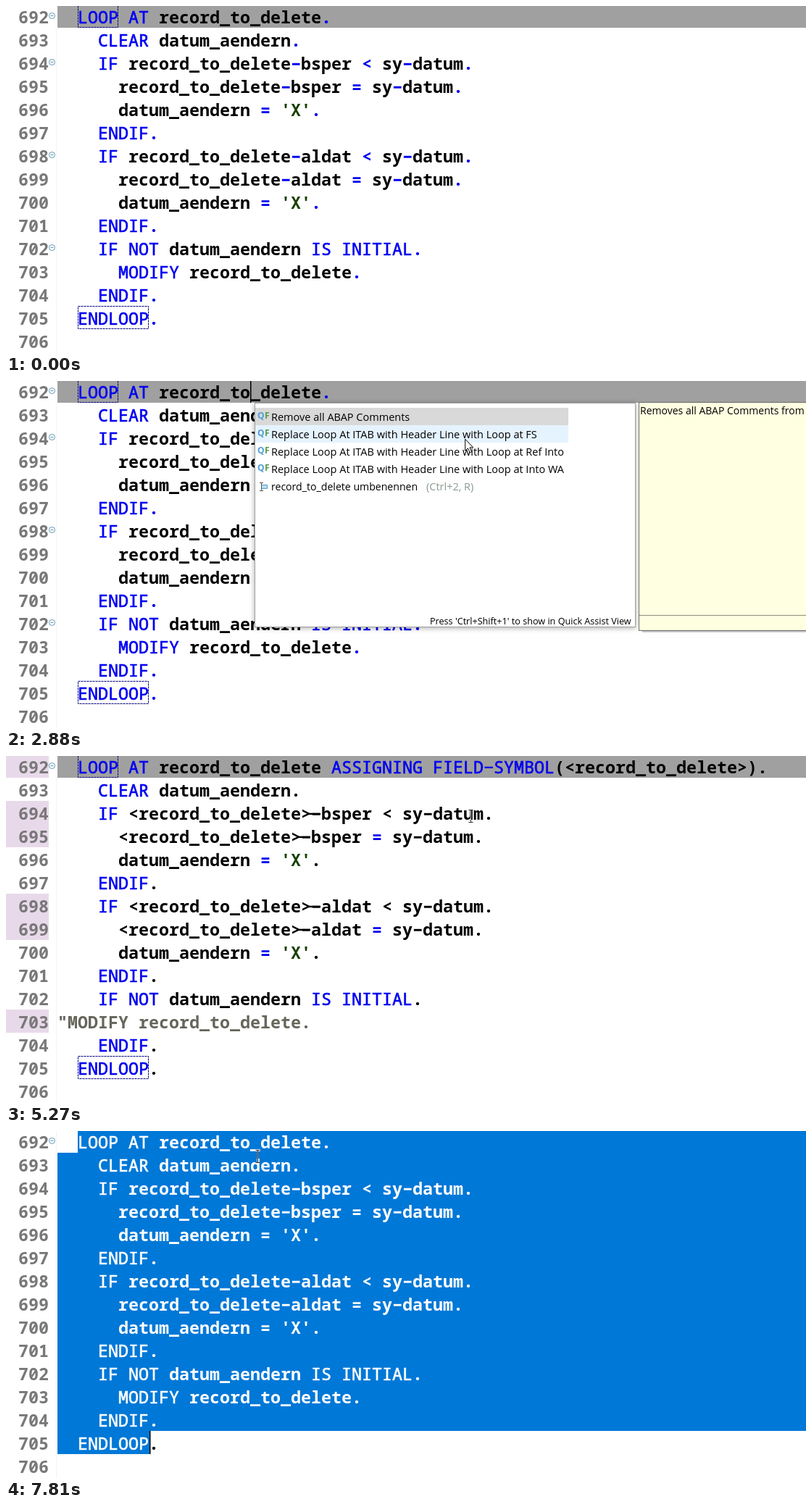
Animation of 1104 by 479 pixels, one loop 8 s. Source, as an HTML page with a canvas:

```html
<!DOCTYPE html>
<html>
<head>
<meta charset="utf-8">
<style>
html, body { margin: 0; width: 100%; height: 100%; overflow: hidden; background: #fff; }
canvas { display: block; }
</style>
</head>
<body>
<canvas id="stage" width="1104" height="479"></canvas>
<script>
const g = document.getElementById('stage').getContext('2d');
const LOOP_MS = 8000, ROW = 32, CELL = 14, LEFT = 71;
const BLUE = '#0000f0';
const mono = weight => `${weight} ${CELL / 0.6}px "Noto Sans Mono", "DejaVu Sans Mono", monospace`;
const sans = (size, weight = 400) => `${weight} ${size}px "Open Sans", "Noto Sans", sans-serif`;

const before = `  LOOP AT record_to_delete.
    CLEAR datum_aendern.
    IF record_to_delete-bsper < sy-datum.
      record_to_delete-bsper = sy-datum.
      datum_aendern = 'X'.
    ENDIF.
    IF record_to_delete-aldat < sy-datum.
      record_to_delete-aldat = sy-datum.
      datum_aendern = 'X'.
    ENDIF.
    IF NOT datum_aendern IS INITIAL.
      MODIFY record_to_delete.
    ENDIF.
  ENDLOOP.`.split('\n');
const after = before.map((line, i) =>
  i === 0 ? line.replace('.', ' ASSIGNING FIELD-SYMBOL(<record_to_delete>).')
  : i === 11 ? '"' + line.trim()
  : line.replace('record_to_delete', '<record_to_delete>'));
const changedRows = [0, 2, 3, 6, 7, 11];
const foldRows = [0, 2, 6, 10];
const TOKEN = /".*|'X'|<\w+>|[A-Z][A-Z-]*[A-Z]|\w+|\S/g;

const proposals = [
  'Remove all ABAP Comments',
  'Replace Loop At ITAB with Header Line with Loop at FS',
  'Replace Loop At ITAB with Header Line with Loop at Ref Into',
  'Replace Loop At ITAB with Header Line with Loop at Into WA'
];

// time, x, y of the pointer
const path = [
  [140, 1034, 470], [700, 304, 52], [920, 331, 36], [1060, 331, 35], [1200, 335, 17],
  [2340, 335, 17], [2940, 642, 82], [3480, 642, 82], [3600, 640, 83], [6670, 641, 83],
  [7010, 347, 35], [8000, 347, 35]
];

function pointer(t) {
  const n = Math.max(1, path.findIndex(p => p[0] > t));
  const [t0, x0, y0] = path[n - 1], [t1, x1, y1] = path[n];
  const u = (t - t0) / (t1 - t0), k = u * u * (3 - 2 * u);
  return [x0 + (x1 - x0) * k, y0 + (y1 - y0) * k];
}

function rect(x, y, w, h, color) {
  g.fillStyle = color;
  g.fillRect(x, y, w, h);
}

function text(str, x, y, color, font) {
  g.font = font;
  g.fillStyle = color;
  g.fillText(str, x, y);
}

// regular weight thickened to a medium one
function mediumText(str, x, y, color) {
  text(str, x, y, color, mono(400));
  g.strokeStyle = color;
  g.lineWidth = .6;
  g.strokeText(str, x, y);
}

function stroke(d, color, width = 1) {
  g.strokeStyle = color;
  g.lineWidth = width;
  g.stroke(new Path2D(d));
}

function tokenColor(token, opColor) {
  if (token[0] === '"') return '#66665c';
  if (token === "'X'") return '#174000';
  if (token === '=' || /^[A-Z]/.test(token)) return BLUE;
  return /^[<\w]./.test(token) ? '#000' : opColor;
}

function codeLine(line, row, opts) {
  const y = row * ROW + 24;
  for (const { 0: token, index } of line.matchAll(TOKEN)) {
    const x = LEFT + index * CELL, label = token.replace('-', '\u2212');
    let color = tokenColor(token, opts.opColor);
    if (opts.selected) color = row === 13 && token === '.' ? '#000' : '#fff';
    if (opts.linkRow === row && /^[a-z]/.test(token)) {
      color = '#0066c4';
      rect(x, y + 3, token.length * CELL, 2, color);
    }
    if (/^[A-Z]/.test(token)) mediumText(label, x, y, color);
    else text(label, x, y, color, mono(700));
    if (opts.ligature && token === '-' && line[index - 1] === '>') rect(x - 6, y - 9.3, 19, 2.4, color);
  }
}

function foldMarker(row) {
  const y = row * ROW + 13.5;
  stroke(`M59.5 ${y}a4 4 0 1 0 8 0a4 4 0 1 0 -8 0M61.5 ${y}h4`, '#5f97b4');
}

function dashedBox(x, y, w, h) {
  g.setLineDash([3, 1]);
  stroke(`M${x + .5} ${y + .5}h${w}v${h}h${-w}z`, '#000080');
  g.setLineDash([]);
}

function editor(t) {
  const selected = t >= 7810, replaced = t >= 4730 && !selected;
  rect(0, 0, 1104, 479, '#fff');
  rect(69, 0, 1, 479, '#f3f3f3');
  if (selected) {
    rect(99, 0, 1005, 30, '#0078d7');
    rect(LEFT, 30, 1033, 384, '#0078d7');
    rect(LEFT, 414, 127, 32, '#0078d7');
    rect(198, 414, 1.5, 32, '#000');
  } else {
    rect(LEFT, 0, 1033, 30, '#a0a0a0');
  }
  if (replaced) for (const row of changedRows) rect(0, row * ROW - 2, 59, ROW, '#e8d9ea');
  for (let row = 0; row < 15; row++) text(692 + row, 17, row * ROW + 24, '#787878', mono(600));
  const allFolds = t < 4730 || (t >= 6010 && !selected);
  foldRows.slice(0, allFolds ? 4 : 1).forEach(foldMarker);

  const opts = {
    selected,
    opColor: replaced && t < 5730 ? '#000' : BLUE,
    ligature: replaced && t < 5730,
    linkRow: selected || t < 7210 ? -1 : t < 7340 ? 0 : 1
  };
  (replaced ? after : before).forEach((line, row) => codeLine(line, row, opts));
  if (!selected && (t < 4730 || t >= 5240)) {
    dashedBox(99, -2, 55, 31);
    dashedBox(99, 414, 97, 31);
  }
  if (t >= 1200 && t < 4590) rect(337, 0, 1.5, 30, '#000');
}

function renameIcon(x, y) {
  rect(x + 3, y + 3, 9, 6, '#b9dcf2');
  stroke(`M${x + 3.5} ${y + 3.5}h8v5h-8z`, '#5a9cc8');
  stroke(`M${x + 1} ${y + .5}h5M${x + 3.5} ${y + .5}v11M${x + 1} ${y + 11.5}h5`, '#555');
}

function popup(t) {
  g.shadowColor = 'rgba(0, 0, 0, .35)';
  g.shadowBlur = 7;
  g.shadowOffsetY = 1;
  rect(343, 30, 526, 310, '#a0a0a0');
  g.shadowColor = 'transparent';
  rect(344, 31, 524, 308, '#fff');
  const picked = t >= 3560;
  if (!picked) rect(344, 37, 432, 24, '#d9d9d9');
  if (t >= 2800) rect(344, 61, 432, 24, picked ? '#cce8ff' : '#e5f3ff');
  proposals.forEach((label, i) => {
    const y = 55 + i * 24;
    text('Q', 347, y - 3, '#4f9fd8', sans(12, 700));
    text('F', 357, y - 3, '#5b9a4c', sans(12, 700));
    text(label, 366, y, '#000', sans(14.5));
  });
  if (t < 2600) {
    text('Loading quick assist proposals ...', 366, 151, '#000', sans(14.1));
  } else {
    renameIcon(349, 140);
    text('record_to_delete umbenennen', 366, 151, '#000', sans(14.1));
    text('(Ctrl+2, R)', 580, 151, '#8a9a8e', sans(14.5));
  }
  text("Press 'Ctrl+Shift+1' to show in Quick Assist View", 585, 336, '#000', sans(12.64));
}

function docPanel(t) {
  rect(878, 344, 226, 3, '#c8c8c8');
  rect(873, 29, 231, 316, '#6b6b6b');
  rect(874, 30, 230, 314, '#ffffe1');
  rect(874, 323, 230, 1, '#8c8c80');
  const label = t < 4030 ? 'Removes all ABAP Comments from' : 'Replace Loop At ITAB with Header Line';
  text(label, 875, 46, '#000', sans(14));
}

function iBeam(x, y) {
  g.globalCompositeOperation = 'difference';
  stroke(`M${x - 3} ${y - 8.5}h6M${x} ${y - 8}v16M${x - 3} ${y + 8.5}h6`, '#d0d0d0');
  g.globalCompositeOperation = 'source-over';
}

function shape(d, x, y) {
  g.save();
  g.translate(x, y);
  g.fillStyle = '#fff';
  g.fill(new Path2D(d));
  stroke(d, '#000');
  g.restore();
}

const ARROW = 'M0 0V16L3.7 12.6L6.5 18.5L9 17.4L6.3 11.6H11Z';
const HAND = 'M-1 1Q1 -1 2.5 1V8L9 9.5Q11 10 10.5 13L9 20H1L-5 13Q-5 10 -1 12Z';

function cursor(t) {
  if (t < 140) return;
  const [x, y] = pointer(t);
  const inside = (from, to) => t >= from && t < to;
  if (inside(1200, 1340) || inside(3560, 3990) || inside(4270, 4660)) {
    g.fillStyle = 'rgba(255, 238, 0, .52)';
    g.beginPath();
    g.arc(x - 1.5, y - .5, 14.5, 0, 7);
    g.fill();
  }
  const overPopup = inside(1800, 4590) && x > 343 && y > 30;
  if (overPopup || inside(4590, 4730)) shape(ARROW, x, y);
  else if (inside(7210, 7810)) shape(HAND, x - 1, y);
  else iBeam(Math.round(x) + .5, Math.round(y));
}

function frame(now) {
  const t = now % LOOP_MS;
  editor(t);
  if (t >= 1800 && t < 4590) popup(t);
  if (t >= 2340 && t < 4590) docPanel(t);
  cursor(t);
  requestAnimationFrame(frame);
}
requestAnimationFrame(frame);
</script>
</body>
</html>
```
